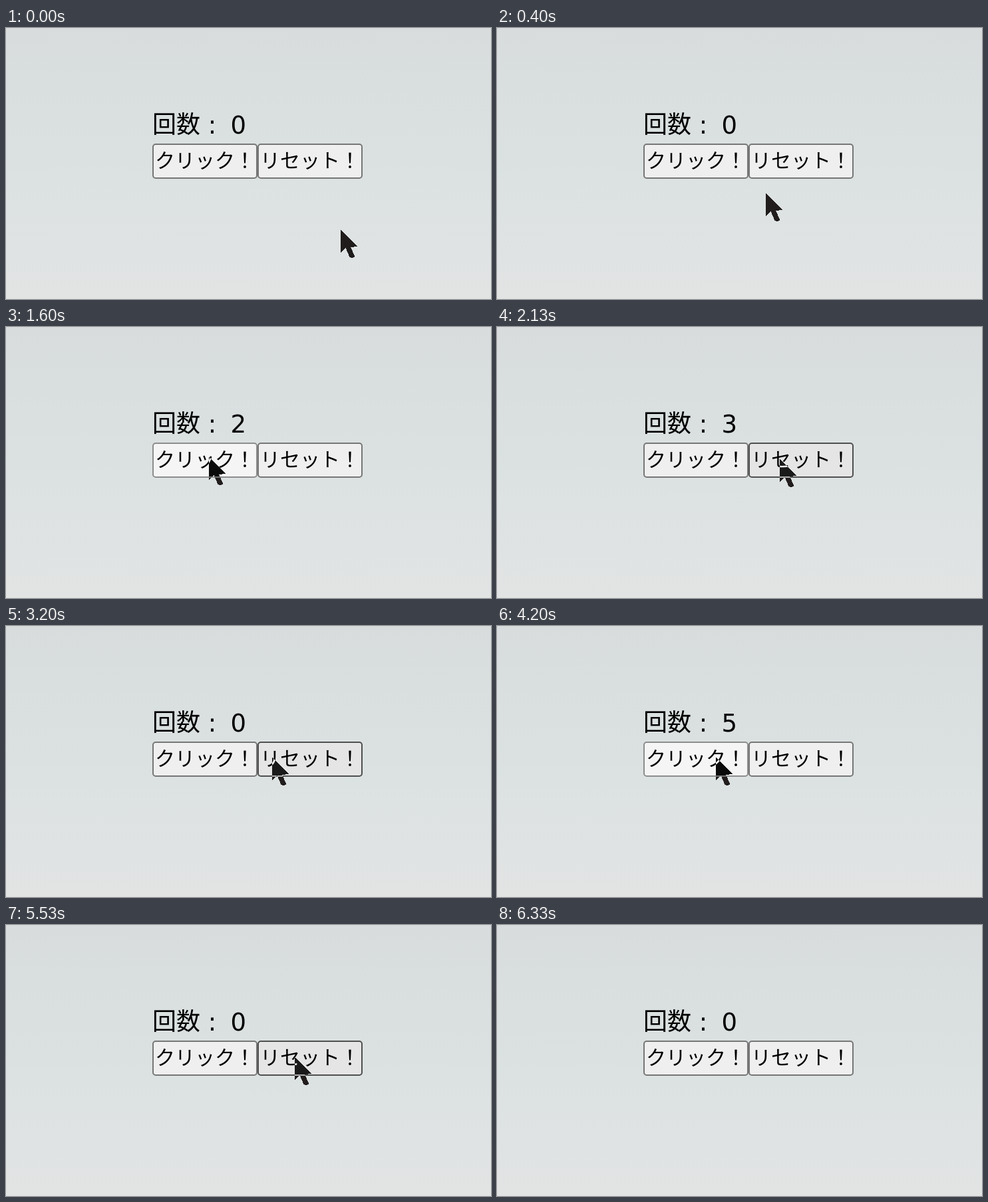
These frames come from a looping animation (729x408 px, 6790 ms). An HTML page:

```html
<!DOCTYPE html>
<html lang="ja">
<head>
<meta charset="utf-8">
<title>カウンター</title>
<style>
html, body { margin: 0; width: 100%; height: 100%; overflow: hidden; background: #dce0e0; }
svg { display: block; width: 729px; height: 408px; }
text { font-family: "Noto Sans CJK JP", "Noto Sans CJK", sans-serif; fill: #000; }
.label { font-size: 36px; }
.digit { font-family: "DejaVu Sans", sans-serif; font-size: 37px; text-anchor: middle; }
.caption { font-size: 30px; }
.button { fill: #efefef; stroke: #767676; stroke-width: 2; }
.hover { fill: #e5e5e5; stroke: #4f4f4f; }
.active { fill: #f5f5f5; stroke: #8d8d8d; }
#pointer { fill: #fff; mix-blend-mode: difference; shape-rendering: crispEdges; }
</style>
</head>
<body>
<svg viewBox="0 0 729 408">
  <defs>
    <linearGradient id="sky" x1="0" y1="0" x2="0" y2="1">
      <stop offset="0" stop-color="#d8dcdd"/>
      <stop offset=".5" stop-color="#dbe1e1"/>
      <stop offset="1" stop-color="#e2e4e4"/>
    </linearGradient>
  </defs>
  <rect width="729" height="408" fill="url(#sky)"/>
  <text class="label" x="220" y="158">回数</text>
  <text class="digit" x="310" y="159">:</text>
  <text class="digit" id="count" x="349.3" y="159">0</text>
  <rect class="button" x="221" y="175" width="156" height="51" rx="4"/>
  <rect class="button" x="379" y="175" width="156" height="51" rx="4"/>
  <text class="caption" x="224" y="210">クリック！</text>
  <text class="caption" x="382" y="210">リセット！</text>
  <polygon id="pointer" points="0,0 0,34 7.5,27 13.5,41 16,42 21,41 21,39 15,26 25,25"/>
</svg>
<script>
const LOOP = 6790, CLICK = 0, RESET = 1, NONE = -1;

// time, count, pressed button
const states = [
  [0, 0, NONE], [1330, 0, CLICK], [1470, 1, CLICK], [1600, 2, CLICK], [1870, 3, NONE],
  [2730, 3, RESET], [3000, 0, NONE], [3530, 0, CLICK], [3670, 1, CLICK], [3800, 2, CLICK],
  [3930, 3, CLICK], [4070, 4, CLICK], [4200, 5, CLICK], [4470, 6, NONE],
  [5330, 6, RESET], [5530, 0, NONE]
];

// time, pointer x, y
const path = [
  [0, 503, 304],
  ...glide(70, 11, [503, 304], [329, 208], p => p * p * (3 - 2 * p)),
  [800, 318, 201], [870, 304, 195], [930, 302, 194], [1000, 305, 196],
  [2000, 340, 200], [2070, 405, 201], [2130, 425, 199],
  [3200, 400, 198], [3270, 352, 197], [3330, 329, 198],
  [4670, 372, 198], [4730, 416, 198], [4800, 430, 199], [4870, 434, 199],
  ...glide(6000, 5, [434, 199], [214, 384], p => p ** 1.4),
  [6330, 200, 450]
];

function glide(start, n, from, to, ease) {
  return Array.from({ length: n }, (_, i) => {
    const p = ease((i + 1) / n);
    const time = Math.round((start + i * 200 / 3 - 2) / 10) * 10;
    return [time, ...from.map((v, k) => Math.round(v + (to[k] - v) * p))];
  });
}

const at = (table, t) => table.findLast(row => row[0] <= t);

const buttons = document.querySelectorAll(".button");
const count = document.getElementById("count");
const pointer = document.getElementById("pointer");

function draw(t) {
  const [, n, pressed] = at(states, t);
  const [, x, y] = at(path, t);
  count.textContent = n;
  pointer.setAttribute("transform", `translate(${x} ${y})`);
  buttons.forEach((button, i) => {
    const left = 220 + i * 158;
    const over = x >= left && x < left + 158 && y >= 174 && y < 227;
    const look = pressed === i ? " active" : over ? " hover" : "";
    button.setAttribute("class", "button" + look);
  });
}

const begin = performance.now();
function tick() {
  draw((performance.now() - begin) % LOOP);
  requestAnimationFrame(tick);
}
tick();
</script>
</body>
</html>
```
